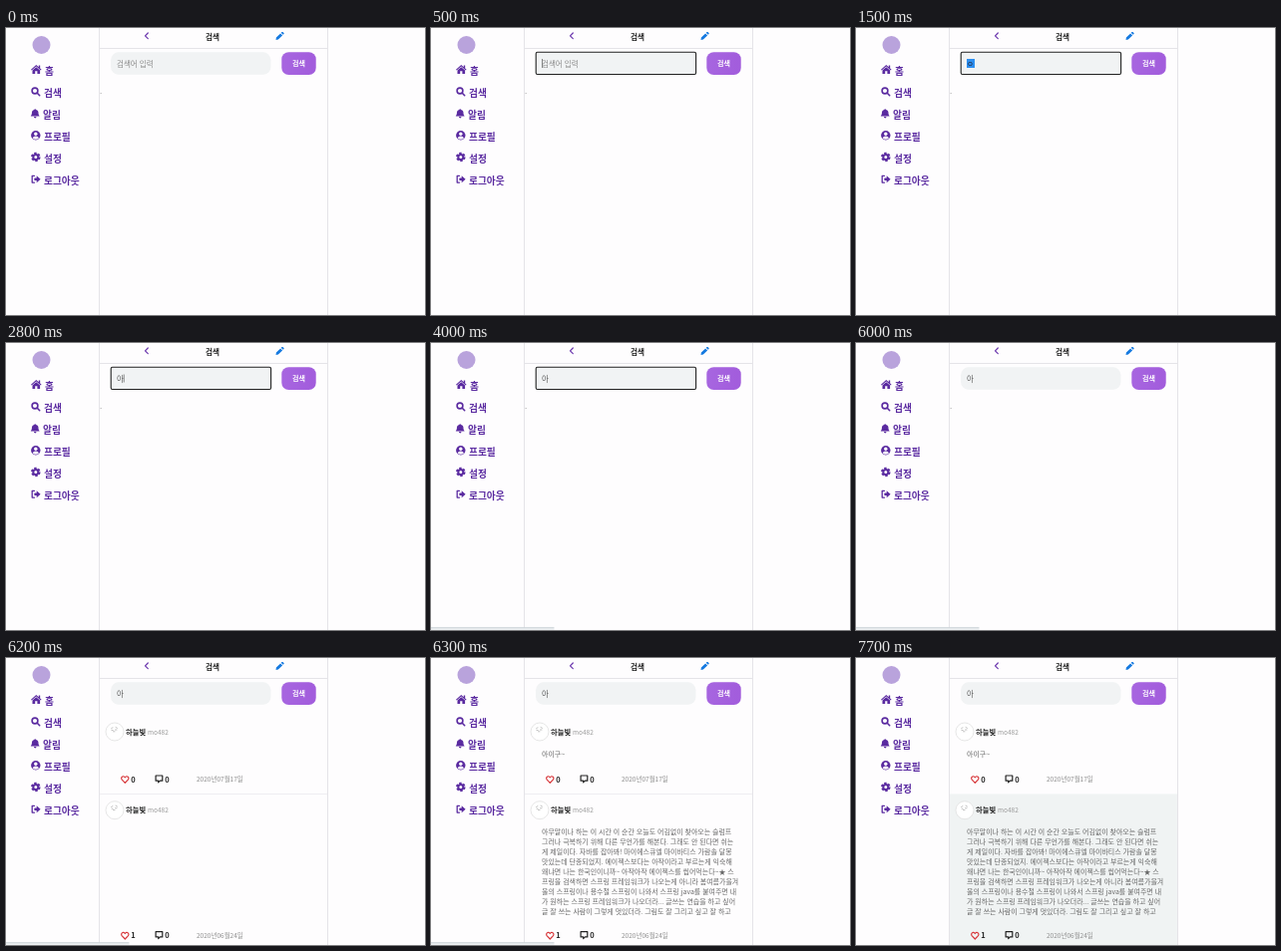
These frames come from a looping animation (420x288 px, 8 s). An HTML page:

```html
<!DOCTYPE html>
<html lang="ko">
<head>
<meta charset="utf-8">
<title>검색</title>
<style>
html, body { margin: 0; width: 100%; height: 100%; overflow: hidden; background: #fefdfe; }
svg { display: block; width: 420px; height: 288px; font-family: "Noto Sans CJK KR", "Noto Sans CJK", "Noto Sans", sans-serif; }
text { white-space: pre; }
.nav { fill: #5a2aa0; }
.nav text { font-size: 9.7px; font-weight: 700; }
.line { stroke: #e5e4e8; fill: none; }
.stroke { fill: none; stroke-linecap: round; stroke-linejoin: round; }
.bold { font-weight: 700; }
.field { font-size: 7.5px; fill: #555; }
.body { font-size: 6.96px; fill: #666; }
.small { font-size: 6.5px; fill: #8c8c8c; }
.count { font-size: 7.5px; font-weight: 700; fill: #222; }
.caret { stroke: #555; stroke-width: .7; }
</style>
</head>
<body>
<svg viewBox="0 0 420 288">
  <defs>
    <linearGradient id="btn"><stop stop-color="#a766e0"/><stop offset="1" stop-color="#a25cdc"/></linearGradient>
    <g id="avatar">
      <circle cx="109" cy="74" r="9" fill="#fff" stroke="#e0e0e0" stroke-width=".8"/>
      <path class="stroke" stroke="#999" stroke-width=".6" d="M105.5 70.8l1.5-1M110 69.5l1.500 .8M106 72.500h1.200M109.500 72h1.500M107.500 73.800h1.500"/>
    </g>
    <g id="icons" class="stroke">
      <path stroke="#d8383c" stroke-width="1.2" d="M119.300 125.300l-3-3.100c-2-2.300 1.200-5 3-2.400c1.800-2.600 5 .1 3 2.400z"/>
      <path stroke="#222" stroke-width="1.200" d="M150.100 118h6.700v5.200h-2.400l-1.700 1.700v-1.700h-2.600z"/>
    </g>
  </defs>

  <g class="nav">
    <circle cx="35.5" cy="17" r="9" fill="#b9a3dc"/>
    <path d="M25 41.700l5.300-4.700 2.500 2.200v-1.600h1.400v2.900l1.400 1.200-.8.900-4.500-4-4.500 4zM26.500 42.600l3.800-3.300 3.800 3.300v3.300h-2.700v-2.600h-2.200v2.600h-2.700z"/>
    <g class="stroke" stroke="#5a2aa0" stroke-width="1.600">
      <circle cx="29" cy="63" r="2.900"/>
      <path d="M31.300 65.300l2.400 2.400"/>
    </g>
    <path d="M29.200 81.200c.6 0 .8.400.8.800 2 .5 2.500 1.900 2.500 3.500 0 1.500.7 2.200 1.100 2.900h-8.800c.4-.7 1.100-1.400 1.100-2.900 0-1.600.5-3 2.500-3.500 0-.4.200-.8.800-.8zM27.900 89.100h2.600q-.2 1.300-1.300 1.300t-1.300-1.300z"/>
    <circle cx="29.800" cy="107.700" r="4.700"/>
    <circle cx="29.800" cy="106.200" r="1.700" fill="#fefdfe"/>
    <path d="M26.700 110.400q.5-1.800 3.100-1.800t3.100 1.800q-1.300 1.300-3.100 1.300t-3.100-1.300z" fill="#fefdfe"/>
    <g fill="none" stroke="#5a2aa0">
      <circle cx="29.800" cy="129.400" r="2.500" stroke-width="2"/>
      <circle cx="29.800" cy="129.400" r="3.900" stroke-width="1.700" stroke-dasharray="2.400 1.684"/>
    </g>
    <path class="stroke" stroke="#5a2aa0" stroke-width="1.300" d="M28.500 148.300h-2.300v6.800h2.300"/>
    <path d="M28.400 150.500h2.300v-2.300l3.900 3.500-3.900 3.500v-2.300h-2.300z"/>
    <g id="menu"></g>
  </g>

  <path class="line" d="M93.500 0V288M322.500 0V288M94 20.500H322"/>
  <path data-on="0-6200" d="M94.500 65.500h1.300" stroke="#bbb"/>
  <path class="stroke" stroke="#6a35ad" stroke-width="1.200" d="M142.300 5l-2.800 2.800 2.800 2.800"/>
  <path fill="#1479e0" d="M270.500 12l.4-2.400 4.200-4.200 2 2-4.200 4.200zM275.700 4.800l.8-.7q.5-.4 1 0l1 1q.4.500 0 1l-.8.700z"/>
  <text class="bold" x="200" y="11.600" font-size="7.600" fill="#222">검색</text>

  <rect x="105" y="24.300" width="160.500" height="22.500" rx="8" fill="#f1f3f4"/>
  <rect data-on="400-6000" x="105.200" y="24.300" width="160.400" height="22.200" rx="1.500" fill="#f1f3f4" stroke="#222" stroke-width="1.100"/>
  <text data-on="0-1500" class="field" x="111" y="38.700" style="fill:#8a8a8a">검색어 입력</text>
  <rect data-on="1500-2200 2700-2800" x="111" y="31" width="8" height="9" fill="#2d8ff0"/>
  <text data-on="1500-1600" class="field" x="111" y="38.700" style="fill:#223">ㅇ</text>
  <text data-on="1600-8000" class="field" x="111" y="38.700">아</text>
  <path data-on="400-900" class="caret" d="M111.500 31v9"/>
  <path data-on="2800-3300 3400-4000 4400-4900 5500-6000" class="caret" d="M118.200 31.500v8"/>

  <rect x="276.300" y="24.300" width="34.400" height="22.700" rx="7" fill="url(#btn)"/>
  <text class="bold" x="287" y="38.400" font-size="7" fill="#fff">검색</text>

  <path data-on="6200-7600" d="M94 136.500H322" stroke="#efeef1"/>
  <rect data-on="7600-8000" x="94" y="136.500" width="228" height="152" fill="#f0f3f3"/>
  <g data-on="6200-8000" id="posts"></g>
  <g data-on="6300-8000" id="bodies"></g>
  <g data-on="3400-6500">
    <path d="M0 285.500H122q1.500 0 1.500 1.500v1H0z" fill="#eef1f3"/>
    <path d="M0 285.800H123.500" stroke="#c8d0d4"/>
  </g>
</svg>
<script>
const PERIOD = 8000;
const add = (id, markup) => document.getElementById(id).insertAdjacentHTML("beforeend", markup);
const text = (x, y, cls, str, style = "") =>
  `<text class="${cls}" x="${x}" y="${y}" style="${style}">${str}</text>`;

[["홈", 39], ["검색", 38], ["알림", 37], ["프로필", 38], ["설정", 38], ["로그아웃", 38]]
  .forEach(([label, x], i) => add("menu", text(x, 47 + i * 21.9, "", label)));

const posts = [
  { top: 0, foot: 0, likes: 0, date: "2020년07월17일", bodyY: 98.7, lines: ["아이구~"] },
  { top: 78.7, foot: 156.7, likes: 1, date: "2020년06월24일", bodyY: 176.7, lines: [
    "아무말이나 하는 이 시간 이 순간 오늘도 어김없이 찾아오는 슬럼프",
    "그러나 극복하기 위해 다른 무언가를 해본다. 그래도 안 된다면 쉬는",
    "게 제일이다. 자바를 잡아봐! 마이에스큐엘 마이바티스 가람솔 달몽",
    "맛있는데 단종되었지. 에이젝스보다는 아작이라고 부르는게 익숙해",
    "왜냐면 나는 한국인이니까~ 아작아작 에이젝스를 씹어먹는다~★ 스",
    "프링을 검색하면 스프링 프레임워크가 나오는게 아니라 봄여름가을겨",
    "울의 스프링이나 용수철 스프링이 나와서 스프링 java를 붙여주면 내",
    "가 원하는 스프링 프레임워크가 나오더라... 글쓰는 연습을 하고 싶어",
    "글 잘 쓰는 사람이 그렇게 멋있더라. 그림도 잘 그리고 싶고 잘 하고"] }
];
for (const { top, foot, likes, date, bodyY, lines } of posts) {
  add("posts", `<use href="#avatar" y="${top}"/><use href="#icons" y="${foot}"/>` +
    text(120, top + 76.7, "bold", "하늘빛", "font-size:7.3px;fill:#222") +
    text(142, top + 76.5, "small", "mo482", "fill:#999") +
    text(125.2, foot + 124.5, "count", likes) +
    text(159.2, foot + 124.5, "count", 0) +
    text(191, foot + 124, "small", date));
  lines.forEach((line, i) => add("bodies", text(111, bodyY + i * 10.05, "body", line)));
}

const timed = [...document.querySelectorAll("[data-on]")].map(node => ({
  node, spans: node.dataset.on.split(" ").map(s => s.split("-").map(Number))
}));

function frame() {
  const t = performance.now() % PERIOD;
  for (const { node, spans } of timed)
    node.style.display = spans.some(([from, to]) => t >= from && t < to) ? "" : "none";
  requestAnimationFrame(frame);
}
frame();
</script>
</body>
</html>
```
